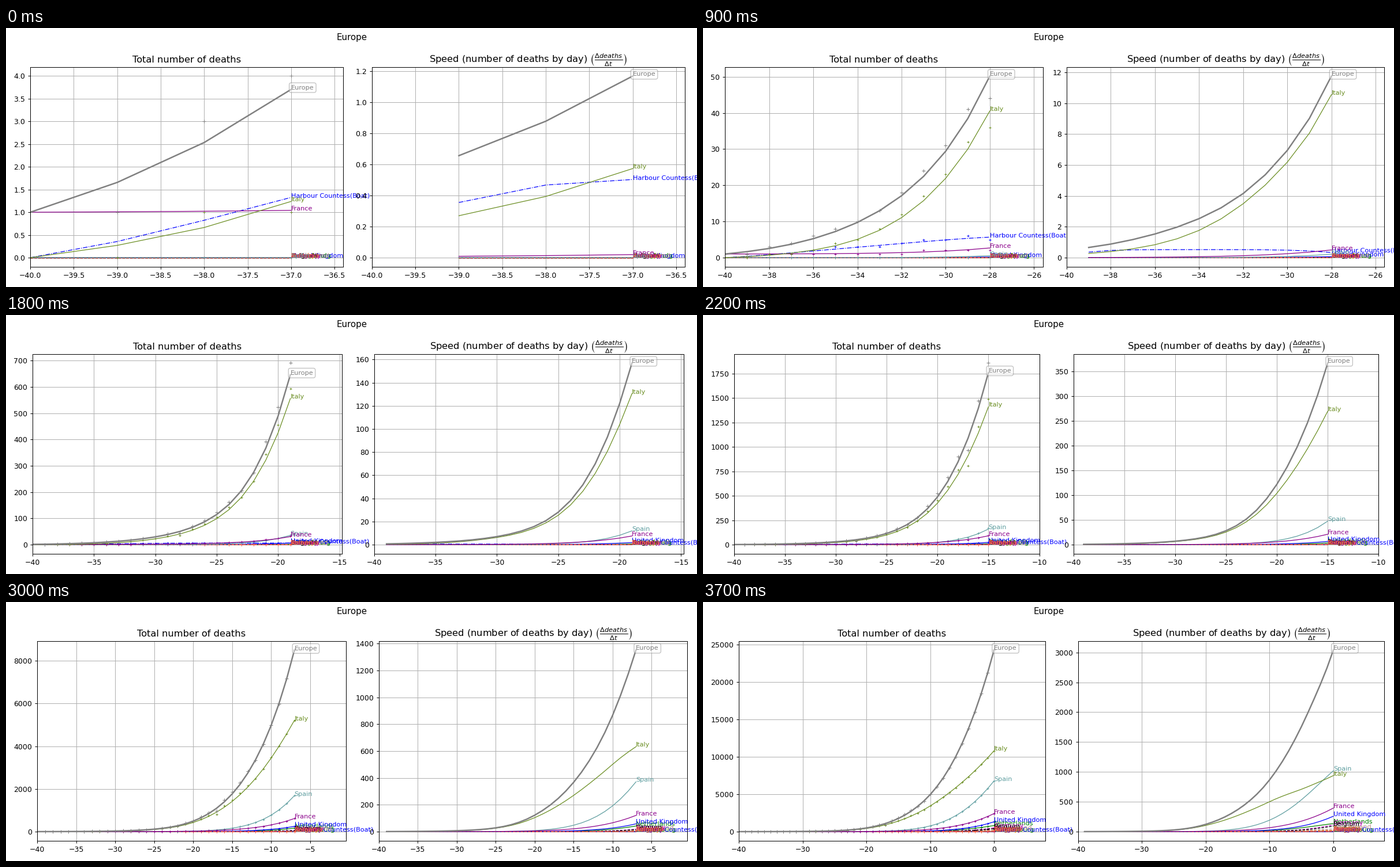
Recreate the animation shown at these times as a matplotlib script. Size 1197 by 450 pixels, loop 6.7 s.

```python
import numpy as np
import matplotlib.pyplot as plt
from matplotlib.animation import FuncAnimation

W, H, DPI = 1197, 450, 90
FRAMES, HOLD_AT = 67, 37
PT = DPI / 72
PAD = 10.8 * PT              # outer margin
EDGE = 3.1                   # least room right of an axes
TICK = 7 * PT                # tick length plus label gap
BASE_W = W * 0.775 / 2.2     # axes width used to measure label overhang
BOTTOM, TOP = 35.25, 382.3

plt.rcParams["font.family"] = "DejaVu Sans"

days = np.arange(-40, 1)
d = days[1:]


def growth(last, rate=0.13, bend=0.0095):
    """Daily speed whose growth rate slows down towards the last day."""
    return last * np.exp(rate * d - bend * d ** 2)


def through(*speeds):
    """Daily speed: cubic Hermite in log space through a few days."""
    x = np.array([-39, -37, -32, -28, -19, -10, -4, 0])
    y = np.log(speeds)
    m = np.gradient(y, x)
    i = np.clip(np.searchsorted(x, d, side="right") - 1, 0, len(x) - 2)
    h = x[i + 1] - x[i]
    t = (d - x[i]) / h
    return np.exp((1 + 2 * t) * (1 - t) ** 2 * y[i]
                  + t * (1 - t) ** 2 * h * m[i]
                  + t * t * (3 - 2 * t) * y[i + 1]
                  + t * t * (t - 1) * h * m[i + 1])


def outbreak(peak, end):
    """Quick rise to a plateau, then a fall to zero around one day."""
    return peak * (1 - np.exp(-1.15 * (d + 40))) / (1 + np.exp(d - end))


def reported(total):
    """Raw counts: slightly ahead of the trend, with gaps every 5.5 days."""
    gap = (days + 17 + 2.75) % 5.5 - 2.75
    swing = 0.07 - 0.19 * np.exp(-4 * gap ** 2)
    fade = 1 / (1 + np.exp((days + 13) / 1.5))
    return np.round(total * (1 + swing * fade))


class Region:
    def __init__(self, name, color, style, speed, start=0):
        self.name, self.color, self.style, self.speed = name, color, style, speed
        self.total = start + np.r_[0, np.cumsum(speed)]
        self.marks = reported(self.total)
        self.main = name == "Europe"


regions = [
    Region("Austria", "red", "--", growth(17)),
    Region("Bulgaria", "brown", "-", growth(1)),
    Region("Denmark", "crimson", "--", growth(9)),
    Region("Finland", "tomato", "-.", growth(2)),
    Region("Luxembourg", "green", "-.", growth(3)),
    Region("Netherlands", "green", "-", growth(135, 0.098, 0.0098)),
    Region("Harbour Countess(Boat)", "blue", "-.", outbreak(0.52, -27.4)),
    Region("United Kingdom", "blue", "-", growth(258, 0.185, 0.004)),
    Region("Greece", "steelblue", "--", growth(5)),
    Region("Norway", "darkorange", "--", growth(5)),
    Region("Portugal", "olivedrab", "--", growth(22)),
    Region("Sweden", "peru", "--", growth(24)),
    Region("Switzerland", "rosybrown", "--", growth(46)),
    Region("Germany", "m", "--", growth(112, 0.19)),
    Region("Belgium", "black", "--", growth(92, 0.19)),
    Region("Hungary", "purple", "--", growth(2)),
    Region("Ireland", "indianred", "--", growth(9)),
    Region("Romania", "tomato", "--", growth(10)),
    Region("Spain", "cadetblue", "-", growth(1020, 0.0923, 0.00747)),
    Region("France", "darkmagenta", "-", growth(395, 0.146, 0.0033), start=1),
    Region("Italy", "olivedrab", "-",
           through(0.27, 0.574, 3.49, 10.56, 130.6, 501, 752, 938)),
    Region("Europe", "gray", "-",
           through(0.657, 1.17, 4.15, 11.76, 157, 866, 1988, 3040), start=1),
]
europe = regions[-1]

fig, (left, right) = plt.subplots(1, 2, figsize=(W / DPI, H / DPI), dpi=DPI)
fig.suptitle("Europe", fontsize=12)
left.set_title("Total number of deaths", fontsize=13)
right.set_title(r"Speed (number of deaths by day) "
                r"$\left(\frac{\Delta deaths}{\Delta t}\right)$", fontsize=13)
for ax in (left, right):
    ax.grid(True)


def add_line(ax, r):
    line, = ax.plot([], [], r.style, color=r.color, lw=2 if r.main else 1)
    box = dict(boxstyle="round", fc="white", ec="gray", alpha=0.5)
    text = ax.text(0, 0, r.name, color=r.color, fontsize=9,
                   bbox=box if r.main else None)
    return line, text


def add_marks(r):
    return left.plot([], [], "+", color=r.color, ms=5 if r.main else 2.5,
                     mew=0.8)[0]


parts = [(r, add_marks(r), add_line(left, r), add_line(right, r))
         for r in regions]


def labels(axis):
    lo, hi = axis.get_view_interval()
    locs = axis.get_majorticklocs()
    names = axis.get_major_formatter().format_ticks(locs)
    return [(v, s) for v, s in zip(locs, names) if lo <= v <= hi]


def text_width(s):
    em = {".": 0.318, "\u2212": 0.838}
    return 10 * PT * sum(em.get(c, 0.636) for c in s)


def place_axes():
    """Tight layout: equal axes, margins set by the tick labels."""
    gap_l, gap_r = (TICK + max(text_width(s) for _, s in labels(ax.yaxis))
                    for ax in (left, right))
    lo, hi = left.get_xlim()
    v, s = labels(left.xaxis)[-1]
    over = max(EDGE, text_width(s) / 2 - (hi - v) / (hi - lo) * BASE_W)
    x0, x1 = PAD + gap_l, W - PAD - over
    gap = over + PAD + gap_r
    w = (x1 - x0 - gap) / 2
    for ax, x in ((left, x0), (right, x0 + w + gap)):
        ax.set_position([x / W, BOTTOM / H, w / W, (TOP - BOTTOM) / H])


def show(pair, x, y):
    line, text = pair
    line.set_data(x, y)
    text.set_position((x[-1], y[-1]))


def update(k):
    n = min(k, HOLD_AT) + 4
    x = days[:n]
    for r, marks, total, speed in parts:
        marks.set_data(x, r.marks[:n])
        show(total, x, r.total[:n])
        show(speed, x[1:], r.speed[:n - 1])
    peaks = (max(europe.total[n - 1], europe.marks[:n].max()),
             europe.speed[n - 2])
    for ax, peak in zip((left, right), peaks):
        ax.set_xlim(-40, x[-1] + 0.2 * (x[-1] + 40))
        ax.set_ylim(-0.05 * peak, 1.05 * peak)
    place_axes()


anim = FuncAnimation(fig, update, frames=FRAMES, interval=100,
                     repeat=True, repeat_delay=0)
plt.show()
```
